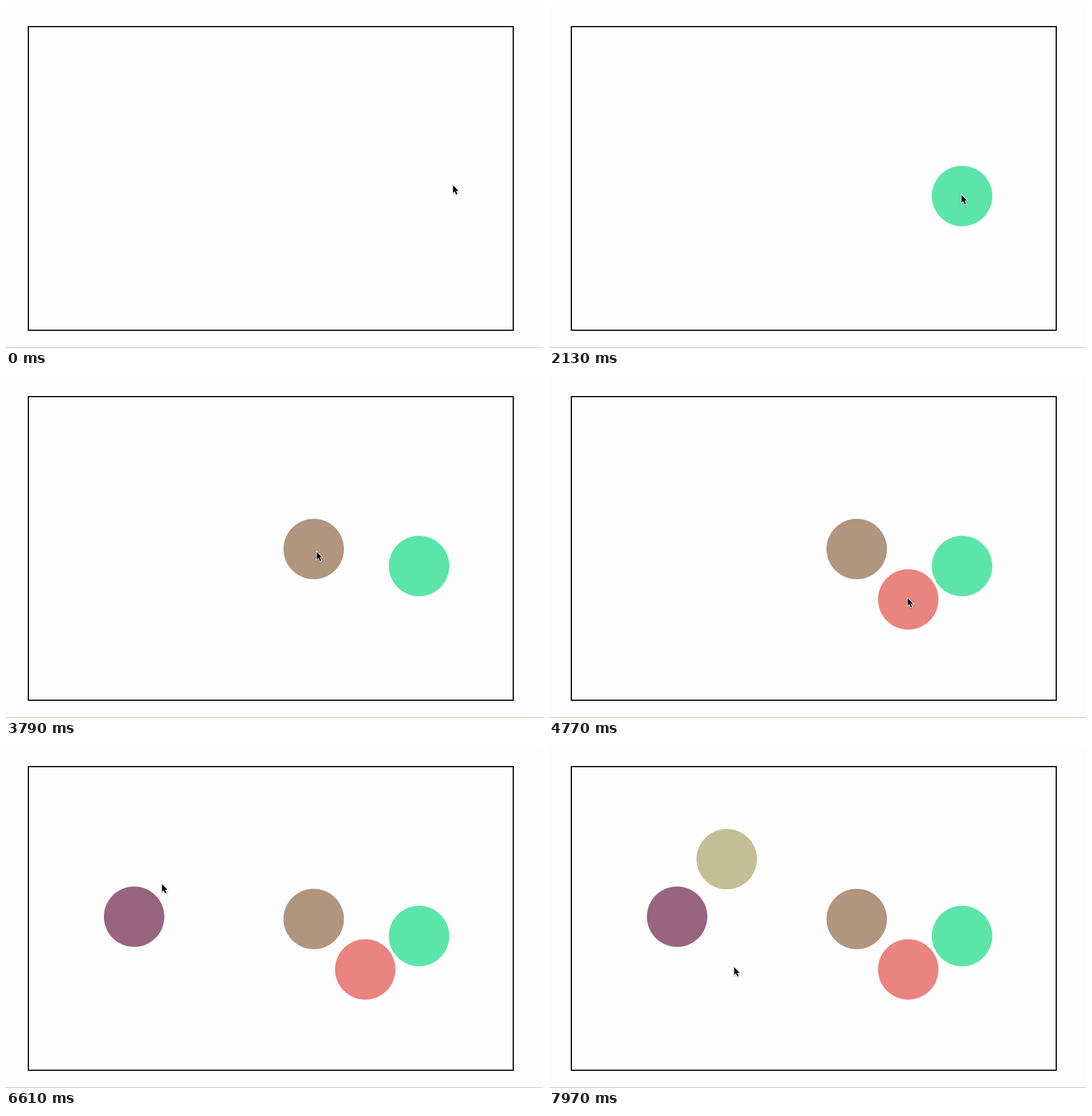
These frames come from a looping animation (938 px wide and 597 px high, 7.99 s). An HTML page:

```html
<!DOCTYPE html>
<html lang="en">
<head>
<meta charset="utf-8">
<title>Click to place circles</title>
<style>
  html, body { margin: 0; width: 100%; height: 100%; overflow: hidden; background: #fdfdfd; }
  svg { display: block; }
  #cursor { filter: drop-shadow(0 1px 1px #0004); }
</style>
</head>
<body>
<svg width="938" height="597" viewBox="0 0 938 597">
  <rect width="938" height="597" fill="#fdfdfd"/>
  <rect y="596" width="938" height="1" fill="#bdbd98"/>
  <rect x="39" y="36" width="847" height="530" fill="none" stroke="#000" stroke-width="2"/>
  <g id="circles"></g>
  <path id="cursor" d="M0 0V13.6L3 10.8L5.3 16.2L7.7 15.2L5.4 9.9H9.5Z"
        stroke="#fff" stroke-width="2" paint-order="stroke"/>
</svg>
<script>
const LOOP = 7990;

// Appearance time, centre, colour
const circles = [
  [2130, 721.5, 331.7, '#5ce5a8'],
  [3390, 537.5, 302, '#b0957f'],
  [4770, 627.5, 390, '#e98480'],
  [6050, 223.8, 298, '#98647e'],
  [7310, 310.5, 197.5, '#c3bf94'],
];

// Start, end, target x, target y, settle (ease out) or constant speed
const moves = [
  [10, 370, 709.5, 332.5, true],
  [400, 550, 720.5, 329.7, true],
  [2530, 3110, 536.5, 300.8, true],
  [3770, 4350, 626.5, 387.5, true],
  [4910, 5450, 275.5, 316, false],
  [5450, 5490, 247.5, 309, false],
  [5570, 5730, 222.5, 295.5, true],
  [6450, 6610, 272.5, 241, false],
  [6690, 6890, 309.5, 196.5, true],
  [7490, 7970, 323.5, 386, false],
];

const group = document.getElementById('circles');
const cursor = document.getElementById('cursor');

const dots = circles.map(([, cx, cy, fill]) => {
  const dot = document.createElementNS('http://www.w3.org/2000/svg', 'circle');
  const attributes = { cx, cy, r: 52.8, fill };
  for (const name in attributes) dot.setAttribute(name, attributes[name]);
  return group.appendChild(dot);
});

function cursorAt(time) {
  let x = 780.8, y = 312.8;
  for (const [start, end, toX, toY, settle] of moves) {
    if (time <= start) break;
    const p = Math.min(1, (time - start) / (end - start));
    const k = settle ? p * (2 - p) : p;
    x += (toX - x) * k;
    y += (toY - y) * k;
  }
  return [x, y];
}

function draw() {
  const time = performance.now() % LOOP;
  dots.forEach((dot, i) => {
    dot.style.display = time >= circles[i][0] ? '' : 'none';
  });
  cursor.setAttribute('transform', `translate(${cursorAt(time)})`);
  requestAnimationFrame(draw);
}
draw();
</script>
</body>
</html>
```
